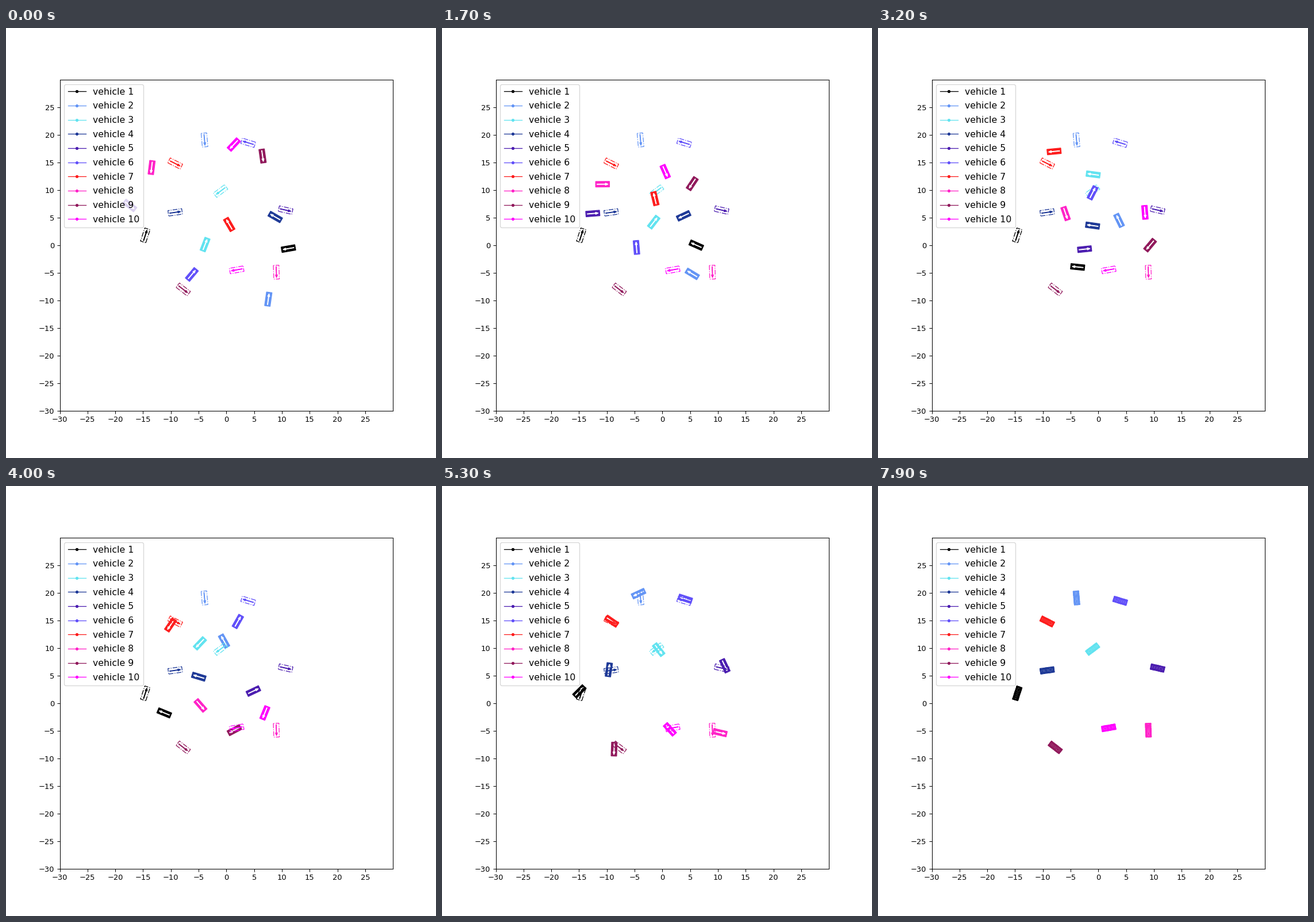
A matplotlib script for the animation above (8 s loop, 748 by 748 pixels).

```python
import numpy as np
import matplotlib.pyplot as plt
from matplotlib.animation import FuncAnimation
from matplotlib.patches import FancyArrow, Rectangle
from matplotlib.transforms import Affine2D

FRAMES, INTERVAL = 80, 100
LENGTH, WIDTH = 2.5, 1.0
OVERSHOOT = 0.1
STEPS = np.array([1, 17, 32, 40, 53, 79])

# color, start pose, three way points, heading on arrival, goal pose;
# positions in stage pixels, headings in degrees
VEHICLES = [
    ("black", (491, 384, 190), [(442, 378), (347, 416), (275, 395)], 45, (242, 361, 72)),
    ("#6495f5", (456, 472, 82), [(435, 428), (419, 335), (379, 270)], 205, (345, 195, 275)),
    ("#62e3f0", (346, 377, 69), [(368, 338), (374, 255), (337, 274)], 308, (373, 284, 217)),
    ("#1f3a97", (468, 329, 150), [(420, 327), (373, 344), (335, 332)], 82, (294, 321, 8)),
    ("#4c1eb0", (215, 309, -38), [(262, 323), (359, 385), (430, 357)], -65, (486, 317, -13)),
    ("#6150f9", (323, 429, 50), [(338, 382), (373, 287), (403, 236)], 162, (421, 200, 163)),
    ("#fd1e1e", (388, 342, 120), [(370, 297), (306, 215), (286, 242)], 325, (294, 236, 333)),
    ("#ff23c8", (253, 243, 263), [(279, 272), (326, 323), (338, 382)], 347, (470, 425, 272)),
    ("#911a5c", (446, 223, 278), [(435, 271), (473, 378), (397, 425)], 268, (308, 455, 322)),
    ("#ff00ff", (396, 203, 227), [(388, 250), (464, 321), (450, 395)], 132, (401, 421, 190)),
]


def to_data(x, y, *_):
    """Stage pixels to a complex point in axes units."""
    return complex((x - 93.2) / 579.7 * 60 - 30, (666 - y) / 575.96 * 60 - 30)


def slopes(p):
    """Slopes at the way points, at rest on both ends."""
    dt = np.diff(STEPS)
    d = np.diff(p) / dt
    inner = (d[:-1] * dt[1:] + d[1:] * dt[:-1]) / (dt[1:] + dt[:-1])
    return np.concatenate([[0], inner, [0]])


def spline(p, m, s):
    k = np.clip(np.searchsorted(STEPS, s, side="right") - 1, 0, len(STEPS) - 2)
    h = STEPS[k + 1] - STEPS[k]
    u = (s - STEPS[k]) / h
    ease = u * u * (3 - 2 * u)
    return (p[k] + (p[k + 1] - p[k]) * ease
            + h * u * (1 - u) * ((1 - u) * m[k] - u * m[k + 1]))


def trajectory(start, via, arrival, goal):
    """Positions and headings (radians) for every frame."""
    p = [to_data(*v) for v in (start, *via)]
    end = to_data(*goal)
    # pass the goal a little, then settle on it
    p = np.array(p + [end + OVERSHOOT * (end - p[-1]), end])
    m = slopes(p)

    # pull away on an arc, follow the path, then turn into the goal
    first, last, final = np.radians([start[2], arrival, goal[2]])
    arc = 2 * np.angle(p[1] - p[0]) - first
    a = np.unwrap([first, arc, *np.angle(m[2:4]), last, final])

    # wheels roll only along the heading
    along = np.exp(1j * a)
    m = (m * along.conj()).real * along

    # headings never swing past a way point
    d = np.diff(a)
    turn = slopes(a)
    turn[1:-1] *= d[:-1] * d[1:] > 0

    s = np.maximum(np.arange(FRAMES), 1)
    return spline(p, m, s), spline(a, turn, s)


def place(parts, z, angle):
    move = Affine2D().rotate(angle).translate(z.real, z.imag) + ax.transData
    for part in parts:
        part.set_transform(move)


def car(arrow_color, **box_style):
    box = Rectangle((-LENGTH / 2, -WIDTH / 2), LENGTH, WIDTH, lw=1, **box_style)
    arrow = FancyArrow(-1, 0, 2, 0, width=0.07, head_width=0.38, head_length=0.5,
                       length_includes_head=True, color=arrow_color, lw=1)
    for part in (box, arrow):
        ax.add_artist(part)
    return box, arrow


fig, ax = plt.subplots(figsize=(8, 8), dpi=93.5)
ticks = np.arange(-30, 30, 5)
ax.set(xlim=(-30, 30), ylim=(-30, 30), xticks=ticks, yticks=ticks)

cars, paths = [], []
for n, (color, *route) in enumerate(VEHICLES, 1):
    ax.plot([], [], ".-", color=color, lw=1, ms=6, label=f"vehicle {n}")
    cars.append(car("white", fc=color, ec=color))
    paths.append(trajectory(*route))
    goal = route[-1]
    place(car(color, fill=False, ec=color, ls="-."), to_data(*goal), np.radians(goal[2]))
ax.legend(loc="upper left", fontsize=12, labelspacing=0.62)


def update(i):
    for parts, (z, angle) in zip(cars, paths):
        place(parts, z[i], angle[i])
    return [part for parts in cars for part in parts]


anim = FuncAnimation(fig, update, frames=FRAMES, interval=INTERVAL,
                     repeat=True, repeat_delay=0, blit=False)
plt.show()
```
